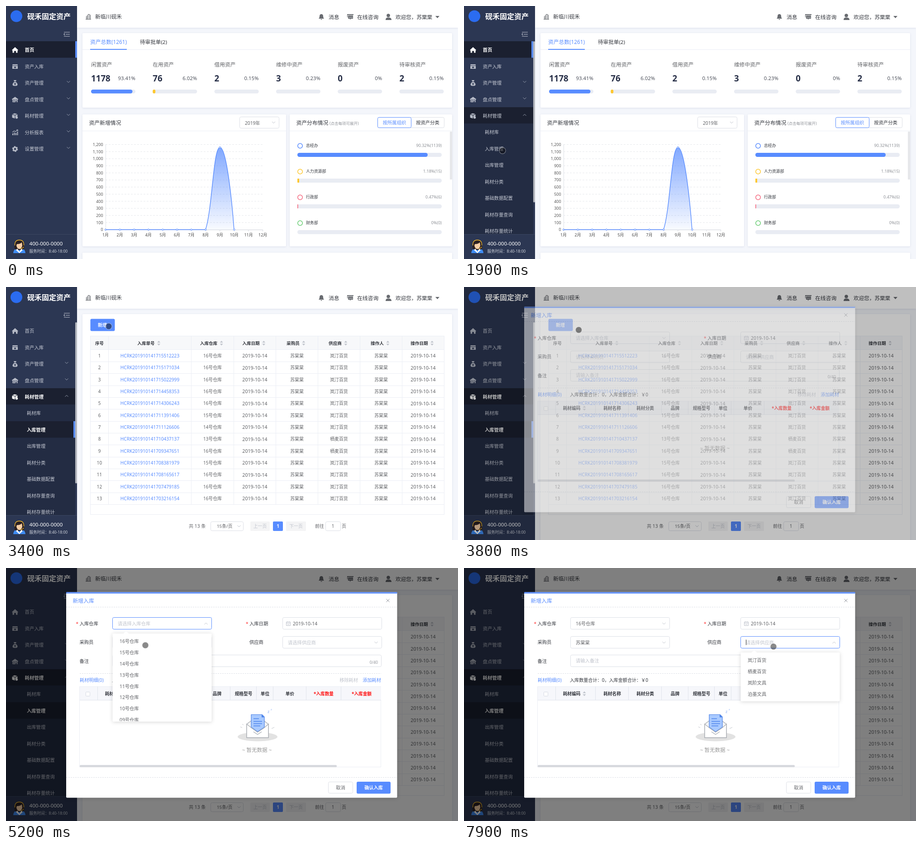
An HTML page that plays this animation: 999x560 px, repeating every 8 s.

```html
<!DOCTYPE html>
<html lang="zh-CN">
<head>
<meta charset="utf-8">
<title>资产管理</title>
<style>
html, body { margin: 0; width: 100%; height: 100%; overflow: hidden; background: #f4f6fb; }
svg { display: block; width: 100%; height: 100%; font-family: 'Noto Sans', 'Noto Sans CJK SC', sans-serif; }
.card { filter: drop-shadow(0 1px 2px rgba(60, 80, 130, .13)); }
.pop { filter: drop-shadow(0 1px 4px rgba(0, 0, 0, .16)); }
</style>
</head>
<body>
<svg id="stage" viewBox="0 0 999 560"></svg>
<script>
const LOOP = 8000, STEP = 100;
const BLUE = '#588cff', YELLOW = '#fdc72f', INK = '#33363d', GREY = '#606266', PALE = '#bfc3cc', LINE = '#ebeef5';
const BUYER = '苏棠棠', SHOPS = ['岚汀百货', '栖麦百货', '岚阶文具', '泊墨文具'];
const BUYERS = [BUYER, '何澄', '梁羽', '陈笙', '周岭舒', '许珂', '孟以南', '罗知远'];
const STORES = [16, 15, 14, 13, 11, 12, 10, '09'].map(n => n + '号仓库');

const clamp = v => Math.max(0, Math.min(1, v));
const ease = v => v * v * (3 - 2 * v);
const each = (list, fn) => list.map(fn).join('');

// y is the visual middle of the glyphs
const text = (x, y, s, size = 10, fill = GREY, anchor = 'start', weight = 400) =>
  `<text x="${x}" y="${y + size * .38}" font-size="${size}" fill="${fill}" text-anchor="${anchor}" font-weight="${weight}">${s}</text>`;
const mid = (x, y, s, size, fill, weight) => text(x, y, s, size, fill, 'middle', weight);
const rect = (x, y, w, h, fill, r = 0, more = '') =>
  `<rect x="${x}" y="${y}" width="${w}" height="${h}" rx="${r}" fill="${fill}" ${more}/>`;
const frame = (x, y, w, h, stroke = '#dcdfe6', r = 3, fill = '#fff') => rect(x, y, w, h, fill, r, `stroke="${stroke}"`);
const path = (d, stroke, width = 1, fill = 'none', more = '') =>
  `<path d="${d}" fill="${fill}" stroke="${stroke}" stroke-width="${width}" ${more}/>`;
const shape = (d, fill) => path(d, 'none', 0, fill, 'fill-rule="evenodd"');
const circle = (x, y, r, fill, more = '') => `<circle cx="${x}" cy="${y}" r="${r}" fill="${fill}" ${more}/>`;
const move = (x, y, s, more = '') => `<g transform="translate(${x} ${y})" ${more}>${s}</g>`;
const hline = (x1, x2, y, c = LINE, more = '') => path(`M${x1} ${y}H${x2}`, c, 1, 'none', more);
const vline = (x, y1, y2, c = LINE) => path(`M${x} ${y1}V${y2}`, c);
const chevron = (x, y, up, c = PALE) => path(up ? `M${x - 3.5} ${y + 2}l3.5 -3.5l3.5 3.5` : `M${x - 3.5} ${y - 2}l3.5 3.5l3.5 -3.5`, c);
const sorter = (x, y) => shape(`M${x - 3.5} ${y - 1}l3.5 -4l3.5 4zM${x - 3.5} ${y + 1.5}l3.5 4l3.5 -4z`, '#c0c4cc');

const ICONS = [
  c => shape('M-7 0L0 -6.5L7 0L5.5 1V6H2V2H-2V6H-5.5V1z', c),
  c => shape('M-5.5 -5H5.5L6 -2.5H-6zM-6 -1.5H6V5H-6zM-.8 0V1H-2.5V2.5H-.8V4H.8V2.5H2.5V1H.8V0z', c),
  c => shape('M-3 -6.5H3L1.8 -3.5H-1.8zM-2 -2.5H2Q6 1 5.5 4Q5 6.5 0 6.5T-5.5 4Q-6 1 -2 -2.5zM-2.5 -.5L-.7 2H-2V3H-.6V5H.6V3H2V2H.7L2.5 -.5H1.3L0 1.3L-1.3 -.5z', c),
  c => shape('M-7 -1L0 -6L7 -1V0H5.5V6H-5.5V0H-7zM-3.5 0V1.5H-1V0zM1 0V1.5H3.5V0zM-3.5 3V4.5H-1V3zM1 3V6H3.5V3z', c),
  c => shape('M-6 -4L-1 -6L5 -4.5L0 -2.5zM-6.5 -3L-.5 -1.5V5.5L-6.5 3.5zM.5 -1.5L5.5 -3.5V0L.5 3z', c) + circle(3.5, 3.2, 2.7, c),
  c => shape('M-6 2H-4V6H-6zM-2.5 0H-.5V6H-2.5zM1 1H3V6H1zM4.5 -2H6.5V6H4.5z', c) + path('M-6 -.5L-2 -3.5L1 -2L6 -6M3 -6H6V-3', c, 1.2),
  c => circle(0, 0, 3.7, 'none', `stroke="${c}" stroke-width="3"`) + circle(0, 0, 5.4, 'none', `stroke="${c}" stroke-width="2" stroke-dasharray="3 2.65"`)
];
const MENU = ['首页', '资产入库', '资产管理', '盘点管理', '耗材管理', '分析报表', '设置管理'];
const SUBMENU = ['耗材库', '入库管理', '出库管理', '耗材分类', '基础数据配置', '耗材存量查询', '耗材存量统计'];
const MENU_TOP = 78, MENU_HEIGHT = 427, ROW = 36.5, OPEN_ROW = 4;

function sidebar(t) {
  const subHeight = SUBMENU.length * ROW * ease(clamp((t - 900) / 500));
  const content = MENU.length * ROW + subHeight, scrolls = content > MENU_HEIGHT, edge = scrolls ? 153 : 157;
  const onList = t >= 2100;
  const active = (top, bar) => rect(0, top, edge, ROW, '#1b2030') + (bar ? rect(edge - 4, top, 4, ROW, BLUE) : '');
  const items = each(MENU, (label, i) => {
    const top = MENU_TOP + i * ROW + (i > OPEN_ROW ? subHeight : 0), y = top + 19.5;
    const isOpen = i === OPEN_ROW && t >= 900, isHome = i === 0 && !onList;
    const lit = isHome || (isOpen && onList), c = lit ? '#fff' : '#b5bac6';
    return (isHome || isOpen ? active(top, isHome) : '') + move(20, y, ICONS[i](c)) +
      text(41.5, y, label, 10.4, lit ? '#fff' : '#c6cad4', 'start', lit ? 700 : 400) +
      (i > 1 ? chevron(edge - 19, y - 2.5, isOpen, '#99a0b0') : '');
  });
  const subTop = MENU_TOP + (OPEN_ROW + 1) * ROW;
  const sub = rect(0, subTop, edge, subHeight, '#232c43') + each(SUBMENU, (label, i) => {
    const top = subTop + i * ROW, on = i === 1 && onList;
    return (on ? active(top, true) : '') + text(46, top + 19, label, 10.3, on ? '#fff' : '#c6cad4', 'start', on ? 700 : 400);
  });
  const agent = shape('M16 547Q17 537 25 537H34Q42 537 43 547z', '#3f8cf3') + shape('M19 537Q17 519 29.5 518Q42 519 40 537L36 540H23z', '#2a2022') +
    shape('M24 527Q32 527 35 523L36 530Q35 537 29.5 538Q24 537 23 530z', '#f7cfa6') + shape('M25 537L29.5 544L34 537L37 540L29.5 547L22 540z', '#fff') +
    path('M19.5 530Q19 518 29.5 518T39.5 530M39 533Q37 537 32 537', '#f0b72e', 1.3);
  return rect(0, 0, 157, 560, '#2c3753') + circle(23, 22.5, 13, '#2b6cf0') + text(47, 22.5, '砚禾固定资产', 16, '#fff', 'start', 700) +
    path('M128 58H141M132 62.5H141M128 67H141M130 60.5L128 62.5L130 64.5', '#c3c8d3', 1.2) +
    `<clipPath id="menu">${rect(0, MENU_TOP, 157, MENU_HEIGHT, '#000')}</clipPath><g clip-path="url(#menu)">${items}` +
    `<clipPath id="sub">${rect(0, subTop, 157, subHeight, '#000')}</clipPath><g clip-path="url(#sub)">${sub}</g></g>` +
    (scrolls ? rect(153, MENU_TOP, 4, MENU_HEIGHT ** 2 / content, '#b4b7be', 2) : '') +
    hline(0, 157, 505.5, '#3b4661') + agent + text(51.5, 525.5, '400-000-0000', 11.6, '#fff') + text(51.5, 543, '服务时间：8:40-18:00', 8.6, '#cfd3dc');
}

function header() {
  const c = '#686b70';
  return rect(157, 0, 842, 48, '#fff', 0, 'class="card"') +
    path('M177.5 29V22.5M179.5 29V20.5M181.5 29V18.5H184.5V29M186.5 29V19.5M176 29.5H188', c, 1.1) + text(197, 24, '新临川砚禾', 11.8, INK) +
    shape('M691 28Q693 26 693 23Q693 18 697 18Q701 18 701 23Q701 26 703 28zM695 29H699Q697 32 695 29z', c) + text(713, 24.5, '消息', 11.8, INK) +
    shape('M757 18H768V20H755V25H754V18zM756 21H767V28H762L760 31V28H756zM758 24V25.5H759.5V24zM761 24V25.5H762.5V24zM764 24V25.5H765.5V24z', c) +
    text(776, 24.5, '在线咨询', 11.8, INK) + circle(845, 21, 3.8, c) + shape('M839 31Q839 26 843 25.5H847Q852 26 852 31z', c) +
    text(861, 24.5, '欢迎您，' + BUYER, 11.6, INK) + shape('M949 22H958L953.5 27z', c);
}

const STATS = [['闲置资产', 1178, 93.41], ['在用资产', 76, 6.02], ['借用资产', 2, .15], ['维修中资产', 3, .23], ['报废资产', 0, 0], ['待审核资产', 2, .15]];
const GROUPS = [['总经办', '90.32%(1139)', 288, BLUE], ['人力资源部', '1.18%(15)', 4, YELLOW], ['行政部', '0.47%(6)', 1.6, '#f5677d'], ['财务部', '0%(0)', 0, '#67cc72']];

function dashboard() {
  const stats = each(STATS, ([label, count, share], i) => {
    const x = 188 + i * 136.3;
    return text(x, 130, label, 11.7, GREY) + text(x, 159.5, count, 18.7, '#283048', 'start', 700) +
      text(x + 98, 159.5, share + '%', 11.4, '#50545e', 'end') + rect(x, 185, 98, 8.5, '#e9ecf3', 4.2) +
      (share > 1 ? rect(x, 185, share * .98, 8.5, i ? YELLOW : BLUE, Math.min(4.2, share / 2)) : '');
  });
  const months = [...Array(12).keys()], px = i => 220 + i * 31.6;
  const grid = each([...Array(13).keys()], i => {
    const y = 495 - i * 15.7;
    return text(214.5, y, (i * 100).toLocaleString('en-US'), 8.9, '#555', 'end') + (i ? hline(220, 568, y, '#e6e8ec', 'stroke-dasharray="4 3"') : '');
  });
  const bump = 'M441 495C456 450 458 313 472.8 313C488 313 500 440 504 495';
  const chart = grid + vline(220.5, 306, 495, '#dde0e6') + hline(220, 568, 495.5, '#cfd3db') +
    each(months, i => vline(px(i), 495, 499, '#d5d8df') + mid(px(i), 506.5, i + 1 + '月', 8.9, '#444')) +
    `<linearGradient id="fade" x1="0" y1="0" x2="0" y2="1"><stop stop-color="${BLUE}" stop-opacity=".75"/><stop offset="1" stop-color="${BLUE}" stop-opacity=".04"/></linearGradient>` +
    shape(bump + 'z', 'url(#fade)') + path('M220 495H441' + bump.slice(8), BLUE, 1.4) +
    each(months.slice(0, 10), i => circle(px(i), i === 8 ? 313 : 495, 1.7, '#fff', `stroke="${BLUE}"`));
  const groups = each(GROUPS, ([name, value, width, color], i) => {
    const y = 308.5 + i * 57;
    return circle(650, y + 1, 5.2, '#fff', `stroke="${color}" stroke-width="1.5"`) + text(663, y, name, 8.9, INK) +
      text(963, y, value, 9, '#8d9096', 'end') + rect(644, y + 16.5, 319, 9, '#e9ecf3', 4.5) + rect(644, y + 16.5, width, 9, color, Math.min(4.5, width / 4));
  });
  return each([[169, 60, 817, 165], [169, 240, 450, 292], [627, 240, 359, 292], [169, 546, 817, 20]], b => rect(...b, '#fff', 2, 'class="card"')) +
    text(186, 79.5, '资产总数(1261)', 11.75, BLUE) + text(296, 79.5, '待审批单(2)', 11.6, INK) +
    hline(169, 986, 96.5) + rect(186, 95, 81, 2, BLUE) + stats +
    text(183.5, 259, '资产新增情况', 11.8, INK) + frame(516.5, 245.5, 87, 25) + text(528, 259, '2019年', 10.2) + chevron(591.5, 258) +
    hline(169, 619, 276.5) + chart +
    text(641.5, 259, '资产分布情况', 11.8, INK) + text(715, 260, '(点击每项可展开)', 8.5, '#8f9298') +
    frame(821.5, 246.5, 147, 23) + frame(821.5, 246.5, 74, 23, BLUE) + mid(858.5, 258.5, '按所属组织', 10.3, BLUE) + mid(932, 258.5, '按资产分类', 10.3, INK) +
    hline(627, 986, 276.5) + rect(981, 278, 5, 106, '#e6e7ea') + groups;
}

// open envelope with a letter, centred on its own origin
const envelope = '<ellipse cy="23" rx="44" ry="10" fill="#e2e2e2"/>' +
  path('M-24 -5L-13 -13H13L24 -5V25H-24z', '#a9adb3', 1.3, '#f4f5f6') +
  path('M-14 -26H10L15 -21V2L0 12L-14 2z', '#4d82e6', 1.2, '#a9caff') + shape('M9 -26L15 -20H9z', '#4b82ea') +
  path('M-9 -17H3M-9 -11H10M-9 -6H10M-9 -1H6', '#4b82ea', 1.5) +
  path('M-24 -5L-14 3L0 13L15 3L24 -5V25H-24z', '#a9adb3', 1.3, '#fff') + path('M-9 12L0 18L9 12', '#a9adb3', 1.3) +
  path('M-38 1l4 2M-34 -5l3 2M31 5l6 -3', '#c3c6cc') + text(22, -33, 'z', 9, '#8aaef5') + text(29, -38, 'z', 6, '#8aaef5');
const emptyState = (x, y, picture) => (picture ? move(x + 1.5, y - 52, envelope) : '') + mid(x, y, '~ 暂无数据 ~', 11.6, '#999');

const COLS = [187, 227, 410, 504, 597, 690, 783, 876, 969].map(x => x - .5);
const HEADS = ['序号', '入库单号', '入库仓库', '入库日期', '采购员', '供应商', '操作人', '操作日期'];
const ORDERS = '15512223 15171034 15022999 14458353 14306243 11391406 11126606 10437137 09347651 08381979 08165617 07479185 03216154'.split(' ');
const ORDER_STORES = [16, 16, 16, 16, 16, 15, 14, 13, 16, 15, 16, 16, 16];

function orderList(t) {
  const loaded = t >= 2800, centre = i => (COLS[i] + COLS[i + 1]) / 2, pitch = 26.33;
  const heads = each(HEADS, (label, i) => {
    const x = centre(i) - (i ? 8.5 : 0);
    return mid(x, 124, label, 9.6, INK, 700) + (i ? sorter(x + label.length * 4.8 + 9, 124) : '');
  });
  const rows = each(ORDERS, (id, r) => {
    const y = 152.3 + r * pitch, shop = SHOPS[r === 7 || r === 8 ? 1 : 0];
    const cells = [r + 1, 'HCRK2019101417' + id, ORDER_STORES[r] + '号仓库', '2019-10-14', BUYER, shop, BUYER, '2019-10-14'];
    return each(cells, (s, i) => mid(centre(i), y, s, i === 1 ? 10.1 : i % 4 === 3 ? 10.6 : 9.9, i === 1 ? BLUE : GREY)) + hline(187, 969, Math.round(y + 12.6) + .5);
  });
  const bottom = loaded ? 481 : 138;
  return rect(169, 60, 817, 510, '#fff', 2, 'class="card"') + rect(186.5, 70.5, 54, 27, BLUE, 3) + mid(213, 84.5, '新增', 10, '#fff', 700) +
    frame(186.5, 108.5, 782, 395, LINE, 0) + rect(187, 109, 781, 29.5, '#f7f8fa') + hline(187, 969, 138.5) +
    each(COLS.slice(1, -1), x => vline(x, 108, bottom)) + heads + (loaded ? rows : emptyState(578, 359, true)) +
    text(404, 529.5, `共 ${loaded ? 13 : 0} 条`, 10.2) + frame(452.5, 519.5, 72, 20) + text(466, 529.5, '15条/页', 9.8) + chevron(515, 529.5) +
    rect(540, 519, 43, 21, '#f4f4f5', 2) + mid(561.5, 529.5, '上一页', 9.8, PALE) + rect(590, 519, 22, 21, BLUE, 2) + mid(601, 529.5, '1', 10, '#fff', 700) +
    rect(619, 519, 44, 21, '#f4f4f5', 2) + mid(641, 529.5, '下一页', 9.8, PALE) + text(683, 529.5, '前往', 10) +
    frame(706.5, 519.5, 33, 20) + mid(722.5, 529.5, '1', 10) + text(742, 529.5, '页', 10);
}

const FIELD = 219, LEFT = 235.5, RIGHT = 611.5;
const SELECTS = [
  { x: LEFT, y: 109.5, hint: '请选择入库仓库', options: STORES, height: 195, focus: 4600, open: 4700, close: 5500 },
  { x: LEFT, y: 151.5, hint: '请选择采购员', options: BUYERS, height: 195, focus: 6300, open: 6400, close: 7100 },
  { x: RIGHT, y: 151.5, hint: '请选择供应商', options: SHOPS, height: 108, focus: 7700, open: 7700, close: LOOP + 100 }
];
const MODAL_COLS = [203, 291, 364, 437, 496, 554, 591, 664, 741];
const MODAL_HEADS = [['耗材编码', 238], ['耗材名称', 327.5], ['耗材分类', 400.5], ['品牌', 466.5], ['规格型号', 525], ['单位', 572.5], ['单价', 627.5], ['*入库数量', 702], ['*入库金额', 786]];

function selectBox(s, t) {
  const focused = t > s.focus && t <= s.close, chosen = t > s.close;
  return frame(s.x, s.y, FIELD, 26, focused ? BLUE : '#dcdfe6') +
    text(s.x + 11.5, s.y + 13.5, chosen ? s.options[0] : s.hint, 10.3, chosen ? GREY : PALE) + chevron(s.x + 206.5, s.y + 13.5, focused) +
    (focused && s.x === RIGHT ? vline(s.x + 12, s.y + 7, s.y + 19, '#333') : '');
}

function dropdown(s, i, t) {
  const p = clamp(Math.min((t - s.open) / 200, 1 - (t - s.close) / 200));
  if (!p) return '';
  const body = rect(0, 0, FIELD, s.height, '#fff', 2, 'class="pop"') + shape('M24 0L30 -5L36 0z', '#fff') +
    `<clipPath id="drop${i}">${rect(0, 0, FIELD, s.height - 1, '#000')}</clipPath><g clip-path="url(#drop${i})">` +
    each(s.options, (o, n) => text(15.5, 17.5 + n * 24.8, o, 10.3, GREY)) + '</g>';
  return `<g transform="translate(${s.x} ${s.y + 35.5}) scale(1 ${p})" opacity="${p}">${body}</g>`;
}

function modal(t) {
  const p = clamp((t - 3700) / 200);
  if (!p) return '';
  const label = (x, y, s, needed) => (needed ? text(x - 8, y, '*', 10, '#f33') : '') + text(x, y, s, 10.3, INK);
  const dashed = (x1, x2, y) => hline(x1, x2, y, '#dcdfe6', 'stroke-dasharray="3 2"');
  const heads = each(MODAL_HEADS, ([s, x]) => mid(x, 278, s, 9.7, s[0] === '*' ? '#f11' : INK, 700));
  const picture = t >= 4000;
  const body = rect(133, 53.5, 731.5, 455, '#fff', 2, 'class="pop"') + rect(133, 53.5, 731.5, 3, BLUE) + text(147.5, 72.5, '新增入库', 11.8, BLUE) +
    path('M840.5 68.5l7 7m0 -7l-7 7', '#8f939b') + dashed(133, 864, 86.5) +
    label(162.5, 123, '入库仓库', true) + label(538, 123, '入库日期', true) + label(162.5, 164.5, '采购员') + label(538, 164.5, '供应商') + label(162.5, 206, '备注') +
    frame(RIGHT, 109.5, FIELD, 26) + path('M619.5 119.5H628.5V127.5H619.5zM619.5 122H628.5M622 118V120M626 118V120M621.5 125H626.5', PALE) + text(634, 123, '2019-10-14', 10.4) +
    frame(LEFT, 192.5, 594, 26) + text(247, 205, '请输入备注', 10.3, PALE) + text(822, 209, '0/40', 8.7, '#909399', 'end') +
    each(SELECTS, s => selectBox(s, t)) + dashed(163, 829, 233.5) +
    text(163, 248.5, '耗材明细(0)', 10.2, BLUE) + text(234, 248.5, '入库数量合计：0，入库金额合计：￥0', 10.1, INK) +
    text(778, 248.5, '移除耗材', 10.2, PALE, 'end') + text(829, 248.5, '添加耗材', 10.2, BLUE, 'end') +
    frame(162.5, 262.5, 666, 178, LINE, 0) + rect(163, 263, 666, 30, '#f6f7fb') + hline(163, 829, 292.5, '#e0e4ec') +
    each(MODAL_COLS, x => vline(x - .5, 262, 293, '#e0e4ec')) + frame(176.5, 274.5, 9, 9, '#d5d9e2', 1) + heads + sorter(266, 278) +
    emptyState(554.5, picture ? 402.5 : 367, picture) + rect(163, 436, 568, 5, '#d7d9de', 2) +
    dashed(133, 864, 463.5) + frame(712.5, 473.5, 54, 25) + mid(739.5, 486, '取消', 10.2) + rect(775, 473, 75, 26.5, BLUE, 3) + mid(812.5, 486, '确认入库', 10.2, '#fff', 700) +
    each(SELECTS, (s, i) => dropdown(s, i, t));
  return rect(0, 0, 999, 560, '#000', 0, `opacity="${p / 2}"`) + move(0, -20 * (1 - p), body, `opacity="${p}"`);
}

const POINTER = [
  [100, 935, 79], [400, 542, 220], [700, 95, 247], [1800, 95, 247], [1900, 85, 320], [2200, 85, 320], [2700, 190, 180], [2800, 203, 163],
  [2900, 225, 141], [3100, 224, 104], [3400, 227, 87], [3700, 227, 87], [3900, 280, 103], [4200, 345, 125], [4600, 345, 125], [5200, 308, 171],
  [5500, 308, 171], [5800, 383, 145], [6000, 370, 165], [6200, 370, 165], [6900, 296, 210], [7100, 296, 210], [7600, 677, 171], [7700, 677, 171], [7900, 684, 174]
];

function pointer(t) {
  if (t < POINTER[0][0]) return '';
  const i = POINTER.findIndex(k => k[0] >= t);
  const b = POINTER[i], a = POINTER[Math.max(0, i - 1)], f = b === a ? 0 : (t - a[0]) / (b[0] - a[0]);
  const at = n => a[n] + (b[n] - a[n]) * f;
  return circle(at(1), at(2), 7, 'rgba(0,0,0,.46)', 'stroke="rgba(255,255,255,.35)" stroke-width="1.3"');
}

const stage = document.getElementById('stage');
let shown = -1;
function tick(now) {
  const t = Math.floor(now % LOOP / STEP) * STEP;
  if (t !== shown) {
    shown = t;
    stage.innerHTML = (t < 2100 ? dashboard() : orderList(t)) + header() + sidebar(t) + modal(t) + pointer(t);
  }
  requestAnimationFrame(() => tick(performance.now()));
}
tick(performance.now());
</script>
</body>
</html>
```
